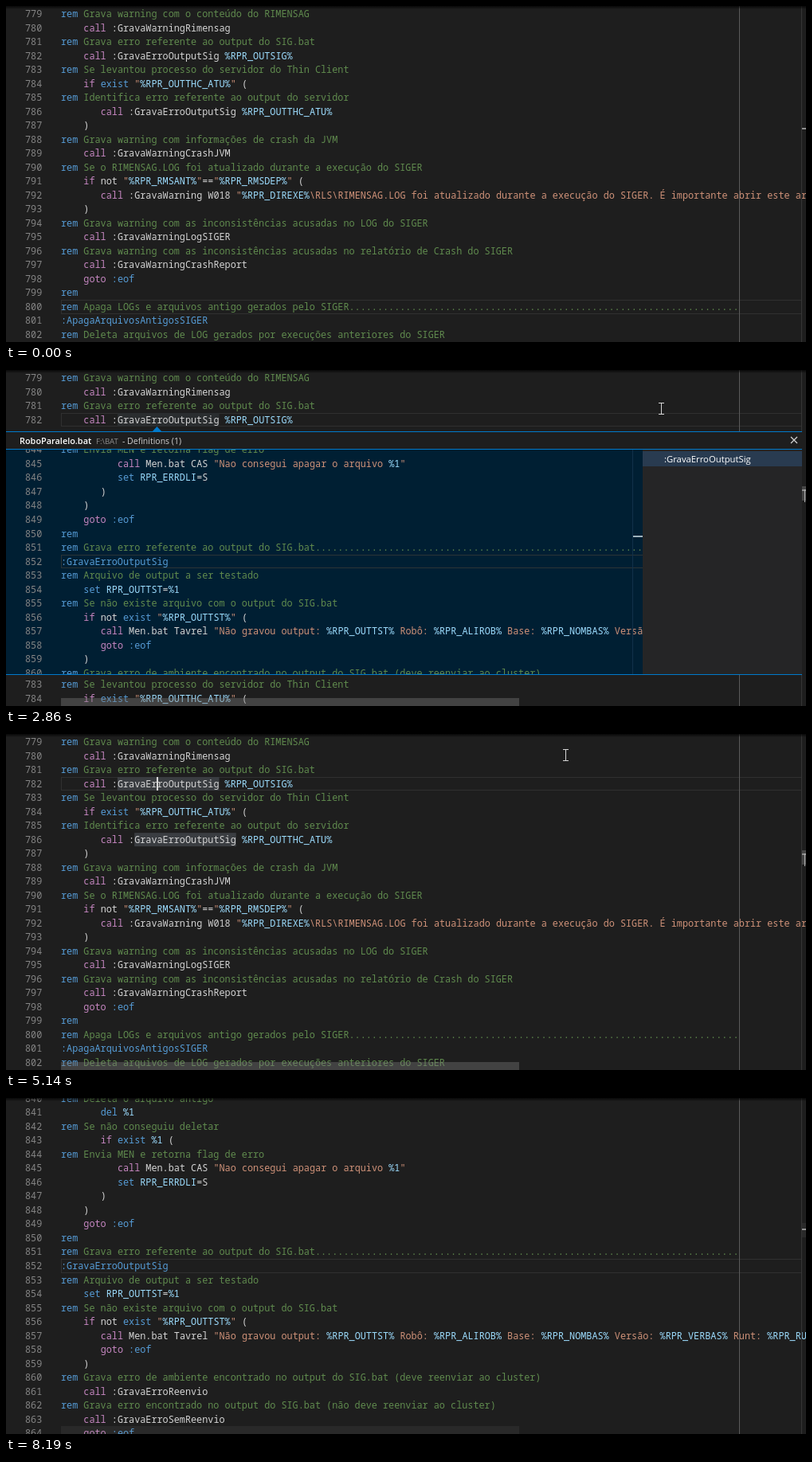
Write an HTML page with a canvas that moves like this. It is 1004 by 422 pixels and loops after 8.27 s.

```html
<!DOCTYPE html>
<html lang="pt">
<head>
<meta charset="utf-8">
<style>
html, body { margin: 0; height: 100%; overflow: hidden; background: #1e1e1e; }
canvas { display: block; }
</style>
</head>
<body>
<canvas id="stage" width="1004" height="422"></canvas>
<script>
const ctx = document.getElementById('stage').getContext('2d');
const LOOP = 8270, LEFT = 69, CHAR = 7.09, ROW = 17.52;
const MONO = '500 11.82px "Noto Sans Mono", monospace';
const sans = (size, weight = 400) => `${weight} ${size}px "Open Sans", sans-serif`;
const BLUE = '#569cd6', GREEN = '#608b4e', PURPLE = '#c586c0', ORANGE = '#ce9178',
      VAR = '#9cdcfe', PLAIN = '#d4d4d4', ACCENT = '#007acc';

const dotted = text => text.padEnd(120, '.');
const upper = String.raw`rem Grava warning com o conteúdo do RIMENSAG
    call :GravaWarningRimensag
rem Grava erro referente ao output do SIG.bat
    call :GravaErroOutputSig %RPR_OUTSIG%
rem Se levantou processo do servidor do Thin Client
    if exist "%RPR_OUTTHC_ATU%" (
rem Identifica erro referente ao output do servidor
       call :GravaErroOutputSig %RPR_OUTTHC_ATU%
    )
rem Grava warning com informações de crash da JVM
    call :GravaWarningCrashJVM
rem Se o RIMENSAG.LOG foi atualizado durante a execução do SIGER
    if not "%RPR_RMSANT%"=="%RPR_RMSDEP%" (
       call :GravaWarning W018 "%RPR_DIREXE%\RLS\RIMENSAG.LOG foi atualizado durante a execução do SIGER. É importante abrir este arquivo"
    )
rem Grava warning com as inconsistências acusadas no LOG do SIGER
    call :GravaWarningLogSIGER
rem Grava warning com as inconsistências acusadas no relatório de Crash do SIGER
    call :GravaWarningCrashReport
    goto :eof
rem
${dotted('rem Apaga LOGs e arquivos antigo gerados pelo SIGER')}
:ApagaArquivosAntigosSIGER
rem Deleta arquivos de LOG gerados por execuções anteriores do SIGER`.split('\n');

const lower = String.raw`rem Deleta o arquivo antigo
       del %1
rem Se não conseguiu deletar
       if exist %1 (
rem Envia MEN e retorna flag de erro
          call Men.bat CAS "Nao consegui apagar o arquivo %1"
          set RPR_ERRDLI=S
       )
    )
    goto :eof
rem
${dotted('rem Grava erro referente ao output do SIG.bat')}
:GravaErroOutputSig
rem Arquivo de output a ser testado
    set RPR_OUTTST=%1
rem Se não existe arquivo com o output do SIG.bat
    if not exist "%RPR_OUTTST%" (
       call Men.bat Tavrel "Não gravou output: %RPR_OUTTST% Robô: %RPR_ALIROB% Base: %RPR_NOMBAS% Versão: %RPR_VERBAS% Runt: %RPR_RUNTIM%"
       goto :eof
    )
rem Grava erro de ambiente encontrado no output do SIG.bat (deve reenviar ao cluster)
    call :GravaErroReenvio
rem Grava erro encontrado no output do SIG.bat (não deve reenviar ao cluster)
    call :GravaErroSemReenvio
    goto :eof`.split('\n');

function tokenize(line) {
  if (line.startsWith('rem')) return [['rem', BLUE], [line.slice(3), GREEN]];
  if (line[0] === ':') return [[line, BLUE]];
  let quoted = false;
  return line.match(/%\w+%|%\d|\w+(?==)|:?[\wÀ-ÿ]+|\s+|./g).map(word => {
    if (word === '"') { quoted = !quoted; return [word, ORANGE]; }
    if (word[0] === '%' || /^RPR_/.test(word)) return [word, VAR];
    if (quoted) return [word, ORANGE];
    if (/^(call|goto|if)$/.test(word)) return [word, PURPLE];
    return [word, /^(exist|set|del|:eof)$/.test(word) ? BLUE : PLAIN];
  });
}
const code = {};
upper.forEach((line, i) => code[779 + i] = tokenize(line));
lower.forEach((line, i) => code[840 + i] = tokenize(line));

function rect(x, y, w, h, color) { ctx.fillStyle = color; ctx.fillRect(x, y, w, h); }
function text(str, x, y, color, font) {
  ctx.font = font; ctx.fillStyle = color; ctx.fillText(str, x, y);
}
function drawLines(from, to, firstCenter) {
  for (let n = from; n <= to; n++) {
    const base = firstCenter + (n - from) * ROW + 4;
    text(n, 24, base, '#858585', MONO);
    let col = 0;
    for (const [word, color] of code[n]) {
      text(word, LEFT + col * CHAR, base, color, MONO);
      col += word.length;
    }
  }
}
function currentLine(center, width, color) {
  const top = Math.round(center - ROW / 2), bottom = Math.round(center + ROW / 2 - 1);
  ctx.strokeStyle = color;
  ctx.lineWidth = 1;
  ctx.strokeRect(LEFT + .5, top + .5, width, bottom - top);
}
const marked = (col, center, color) => rect(LEFT + col * CHAR, center - 8.5, 18 * CHAR, 17, color);
const caret = (x, center) => rect(x, Math.round(center - 8.5), 2, 17, '#d8d8d8');

const clamp = v => Math.max(0, Math.min(1, v));
const grey = alpha => `rgba(121,121,121,${alpha})`;

function drawFrame(barAlpha, sliderY, markY) {
  rect(920, 0, 1, 422, '#5a5a5a');
  rect(998, 0, 1, 422, '#353535');
  rect(999, sliderY, 5, 18, grey(.45 * barAlpha));
  rect(999, markY, 5, 2, '#8f8f8f');
  rect(LEFT, 412, 575, 10, grey(.4 * barAlpha));
}
function drawShadow() {
  const shade = ctx.createLinearGradient(0, 0, 0, 4);
  shade.addColorStop(0, 'rgba(0,0,0,.75)');
  shade.addColorStop(1, 'rgba(0,0,0,0)');
  rect(0, 0, 1004, 4, shade);
}

function drawPeek(t) {
  rect(0, 77, 999, 306, '#1e1e1e');
  rect(0, 99, 799, 283, '#001f33');
  ctx.save();
  ctx.beginPath();
  ctx.rect(0, 99, 799, 283);
  ctx.clip();
  currentLine(240.5, 740, '#2d3436');
  drawLines(844, 860, 100.4);
  rect(786, 99, 1, 283, '#12304a');
  rect(787, 208, 12, 2, t < 2940 ? '#a0b2bc' : '#7c9a62');
  const bars = clamp((t - 2860) / 160) * (1 - clamp((t - 3650) / 790));
  rect(70, 371, 342, 10, grey(.4 * bars));
  rect(787, 202, 12, 18, grey(.4 * bars));
  ctx.restore();

  rect(799, 99, 200, 283, '#252526');
  rect(799, 102, 200, 19, '#293b50');
  text(':GravaErroOutputSig', 826, 116, '#ffffff', sans(11.3));
  text('RoboParalelo.bat', 17, 93, '#ffffff', sans(10.9, 600));
  text('F:\\BAT', 113, 93, '#8f8f8f', sans(9.6));
  text('- Definitions (1)', 146, 93, '#d0d0d0', sans(10.5));
  for (const y of [77, 99, 382]) rect(0, y, 999, 1, ACCENT);
  ctx.fillStyle = ACCENT;
  ctx.beginPath();
  ctx.moveTo(183, 78); ctx.lineTo(189.5, 71); ctx.lineTo(196, 78);
  ctx.fill();
  ctx.strokeStyle = '#d0d0d0';
  ctx.lineWidth = 1.3;
  ctx.beginPath();
  ctx.moveTo(985, 84); ctx.lineTo(993, 92);
  ctx.moveTo(993, 84); ctx.lineTo(985, 92);
  ctx.stroke();
}

// Pointer stops: time, x, y
const stops = [
  [0, 890, 440], [69, 890, 440], [70, 823, 390], [390, 192, 26], [1000, 192, 26],
  [1070, 192, 61], [1380, 192, 61], [1700, 822, 48], [4970, 822, 48], [5050, 773, 38],
  [5140, 702, 26], [7000, 702, 26], [7450, 985, 440], [LOOP, 985, 440]
];
function drawPointer(t) {
  const i = stops.findIndex(stop => stop[0] > t);
  const [t0, x0, y0] = stops[i - 1], [t1, x1, y1] = stops[i];
  const k = (t - t0) / (t1 - t0);
  const x = Math.round(x0 + (x1 - x0) * k), y = Math.round(y0 + (y1 - y0) * k);
  ctx.strokeStyle = '#d6d6d6';
  ctx.lineWidth = 1;
  ctx.beginPath();
  ctx.moveTo(x + .5, y - 6); ctx.lineTo(x + .5, y + 7);
  for (const end of [-6.5, 7.5]) {
    ctx.moveTo(x - 3, y + end); ctx.lineTo(x + 4, y + end);
  }
  ctx.stroke();
}

function drawUpper(t) {
  const clicked = t >= 1390, peek = t >= 2860 && t < 5140;
  const center = clicked ? 62.56 : 377.9;
  currentLine(center, 929, '#303030');
  if (t >= 1620) {
    marked(10, 62.56, peek ? '#2a2d2f' : '#3a3d41');
    if (!peek) marked(13, 132.64, '#3a3d41');
  }
  if (peek) {
    drawLines(779, 782, 10);
    drawLines(783, 784, 395.4);
  } else {
    drawLines(779, 802, 10);
  }
  drawFrame(clamp((t - 70) / 200), 146, clicked ? 150 : 153);
  if (clicked) rect(1002, 150, 1, 16, '#b0b0b0');
  if (peek) drawPeek(t);
  const lit = t < 1930 || (t >= 2400 && t < 5610);
  if (clicked && !peek && lit) caret(189, 62.56);
}

function drawLower(t) {
  currentLine(211, 929, '#303030');
  drawLines(840, 864, .76);
  drawFrame(1 - .72 * clamp((t - 7020) / 770), 157, 164);
  if (t < 6620 || (t >= 7120 && t < 7620) || (t >= 8110 && t < 8190)) caret(69, 211);
}

function render(now) {
  const t = now % LOOP;
  rect(0, 0, 1004, 422, '#1e1e1e');
  (t < 6150 ? drawUpper : drawLower)(t);
  drawShadow();
  drawPointer(t);
}
let start;
function tick(now) {
  start ??= now;
  render(now - start);
  requestAnimationFrame(tick);
}
requestAnimationFrame(tick);
</script>
</body>
</html>
```
